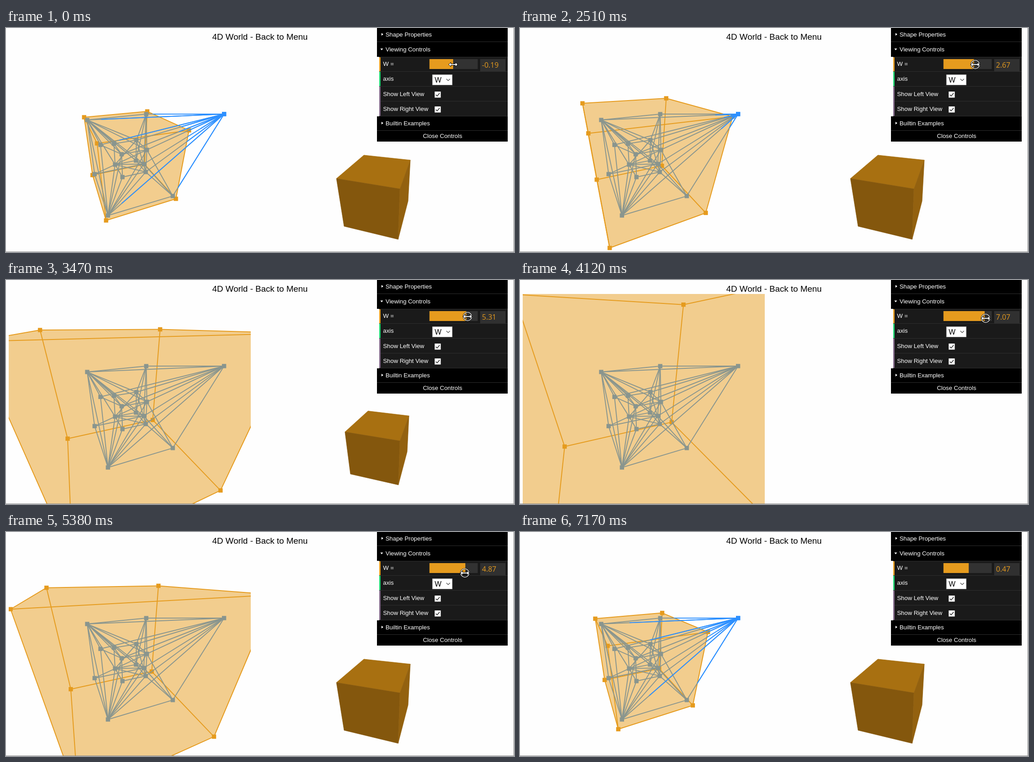
Animation, 1127 px wide and 497 px high, one loop 7.47 s. Source, as an HTML page with a canvas:

```html
<!DOCTYPE html>
<html lang="en">
<head>
<meta charset="utf-8">
<title>4D World</title>
<style>
  html, body { margin: 0; width: 100%; height: 100%; overflow: hidden; background: #fefefe; }
  canvas, svg { position: absolute; left: 0; top: 0; width: 1127px; height: 497px; }
  text { font: 13.3px "Liberation Sans", Arial, sans-serif; fill: #fff; }
  .title { font-size: 19px; fill: #000; text-anchor: middle; }
  .value { font: 16px "Open Sans", "Noto Sans", sans-serif; fill: #e69b1e; }
  .choice { font-size: 16px; fill: #000; }
  .row { fill: #1a1a1a; }
  .rule { stroke: #2f2f2f; }
</style>
</head>
<body>
<canvas id="view" width="1127" height="497"></canvas>
<svg viewBox="0 0 1127 497">
  <path d="M0 496.5H1126.5V0" fill="none" stroke="#8a8a8a"/>
  <text class="title" x="563.5" y="26">4D World - Back to Menu</text>

  <path d="M823 0h290v64H823zM823 196h290v56H823z"/>
  <rect class="row" x="828" y="64" width="285" height="132"/>
  <path class="rule" d="M823 30.5h290M828 64.5h285M828 96.5h285M828 129.5h285M828 162.5h285M828 195.5h285M823 227.5h290"/>
  <path fill="#e69b1e" d="M828 65h3v31h-3z"/>
  <path fill="#1ed36f" d="M828 97h3v32h-3z"/>
  <path fill="#806787" d="M828 130h3v65h-3z"/>
  <path fill="#fff" d="M833 11l4 3-4 3zM833 208l4 3-4 3zM830.5 45.5h6l-3 4z"/>
  <text x="842" y="19">Shape Properties</text>
  <text x="842" y="52">Viewing Controls</text>
  <text x="836.5" y="84">W =</text>
  <text x="836.5" y="117">axis</text>
  <text x="836.5" y="150.5">Show Left View</text>
  <text x="836.5" y="183.5">Show Right View</text>
  <text x="842" y="216">Builtin Examples</text>
  <text x="968.5" y="244" text-anchor="middle">Close Controls</text>

  <rect x="939.5" y="69" width="107" height="22" fill="#323232"/>
  <rect id="fill" x="939.5" y="69" height="22" fill="#e69b1e"/>
  <rect x="1052" y="69" width="56" height="27" fill="#303030"/>
  <text id="value" class="value" x="1056" y="88"></text>

  <rect x="946" y="103.5" width="44" height="23" fill="#fff" stroke="#999" stroke-width=".8"/>
  <text class="choice" x="951" y="121">W</text>
  <path d="M977 113l4 4 4-4" fill="none" stroke="#444" stroke-width="1.2"/>
  <g id="check">
    <rect x="951" y="141" width="13.5" height="13.5" fill="#fff"/>
    <path d="M953.5 148l3 3 5.5-6.5" fill="none" stroke="#222" stroke-width="1.5"/>
  </g>
  <use href="#check" y="33"/>

  <g id="cursor">
    <circle id="press" r="9.3" fill="none" stroke="#000" stroke-width="2.6"/>
    <circle id="ring" r="9.3" fill="none" stroke="#fff" stroke-width="1.3"/>
    <path id="resize" d="M-10 0l5-5v3.5H5V-5l5 5-5 5V1.500H-5V5z" fill="#fff" stroke="#000"/>
    <path id="arrow" d="M0 0v15.5l3.6-3.4 2.4 5.6 2.6-1.1-2.4-5.5h4.9z" fill="#fff" stroke="#000"/>
  </g>
</svg>
<script>
const LOOP = 7470, ORANGE = '#e69b1e', BLUE = '#2d90ff';
const $ = id => document.getElementById(id);
const ctx = $('view').getContext('2d');

// Value of the slider from each moment on.
const steps = [
  [0, -.19], [1480, .03], [1540, .25], [1600, .47], [1710, .69],
  [1850, .91], [1880, 1.13], [2030, 1.57], [2100, 2.01], [2170, 2.23],
  [2450, 2.45], [2510, 2.67], [2640, 3.33], [2940, 3.77], [2990, 3.99],
  [3130, 4.21], [3170, 4.43], [3340, 4.87], [3400, 5.09], [3470, 5.31],
  [3570, 5.97], [3650, 6.41], [3740, 6.63], [3900, 6.85], [4120, 7.07],
  [4820, 6.85], [4850, 6.63], [5000, 6.41], [5080, 6.19], [5160, 5.75],
  [5240, 5.53], [5310, 5.09], [5380, 4.87], [5520, 4.43], [5610, 3.99],
  [5700, 3.33], [5800, 2.89], [5900, 2.45], [6010, 2.01], [6150, 1.57],
  [6340, 1.13], [6390, .69], [6440, .47]
];

// Corner directions from the centre: x, y and nearness per unit of scale.
const corners = {
  A: [-1132, -1007, 0], B: [505, -1337, -1.8], C: [1128, -523, 2.61], D: [-505, -223, 4.22],
  E: [-1130, 525, -2.51], F: [-492, 1303, 1.815], G: [1146, 1018, 0], H: [505, 223, -4.22]
};
const list = text => text.split(' ');
const cubeEdges = list('AB BC CD DA EF FG GH HE AE BH CG DF');
const cubeFaces = list('ABCD EFGH ABHE DCGF ADFE BCGH');

// Lower case is the outer shell of the polytope, upper case the inner one.
const shapeEdges = [
  ...cubeEdges, ...cubeEdges.map(edge => edge.toLowerCase()),
  ...list('Aa Bb Cc Dd Ee Ff Gg Hh ac af ah cf ch fh EB EG EC BG'),
  ...list('aB aD aE cB cD cG fE fD fG bH hG hE aC aH fC gC bC')
];
const shellScale = key => key === 'c' ? 1 / 8 : key > 'Z' ? 1 / 12 : .031;

function place(key, scale) {
  const [x, y, near] = corners[key.toUpperCase()];
  return [x * scale, y * scale, 1 - near * scale];
}
const shapePoint = key => place(key, shellScale(key));
const mix = (p, q, t) => p.map((v, i) => v + (q[i] - v) * t);
const screen = ([x, y, depth]) => [274.5 + x / depth, 288 + y / depth];

// Keeps the part of a polygon that lies before the camera.
function clipNear(points) {
  const near = .03, out = [];
  points.forEach((p, i) => {
    const q = points[(i + 1) % points.length];
    if (p[2] >= near) out.push(p);
    if ((p[2] >= near) !== (q[2] >= near)) out.push(mix(p, q, (near - p[2]) / (q[2] - p[2])));
  });
  return out.map(screen);
}

function trace(points) {
  points.forEach(([x, y], i) => i ? ctx.lineTo(x, y) : ctx.moveTo(x, y));
}

function segment(p, q, color) {
  ctx.beginPath();
  trace(clipNear([p, q]));
  ctx.strokeStyle = color;
  ctx.stroke();
}

function marker(p, color) {
  if (p[2] < .03) return;
  const [x, y] = screen(p);
  ctx.fillStyle = color;
  ctx.fillRect(x - 4.75, y - 4.75, 9.5, 9.5);
}

const isFront = key => 'CDFG'.includes(key.toUpperCase()) ? 1 : -1;
const isTop = key => 'ABCD'.includes(key.toUpperCase()) ? 1 : -1;

// Where the way from a point to corner c leaves the cube by a visible face.
function exitAt(key, scale) {
  return Math.min(...[isFront, isTop].map(sign => {
    const from = sign(key) * shellScale(key);
    return (scale - from) / (shellScale('c') - from);
  }));
}

function drawWorld(w) {
  const scale = 1 / (11 - w);
  const corner = key => place(key, scale);
  ctx.save();
  ctx.beginPath();
  ctx.rect(6, 31, 537, 465);
  ctx.clip();
  ctx.lineWidth = 2;
  ctx.lineJoin = 'bevel';

  for (const [a, b] of cubeEdges) segment(corner(a), corner(b), ORANGE);
  for (const key in corners) marker(corner(key), ORANGE);
  for (const [a, b] of shapeEdges) segment(shapePoint(a), shapePoint(b), BLUE);
  for (const key of 'ABCDEFGHabcdefgh') marker(shapePoint(key), BLUE);

  ctx.beginPath();
  for (const face of cubeFaces) {
    const points = clipNear([...face].map(corner));
    const area = points.reduce((sum, [x, y], i) => {
      const [nx, ny] = points[(i + 1) % points.length];
      return sum + x * ny - y * nx;
    }, 0);
    trace(area < 0 ? points.reverse() : points);
    ctx.closePath();
  }
  ctx.globalAlpha = .5;
  ctx.fillStyle = ORANGE;
  ctx.fill();
  ctx.globalAlpha = 1;

  const tip = shapePoint('c');
  if (shellScale('c') > scale) {
    for (const edge of shapeEdges.filter(e => e.includes('c'))) {
      const key = edge.replace('c', '');
      segment(mix(shapePoint(key), tip, exitAt(key, scale)), tip, BLUE);
    }
    marker(tip, BLUE);
  }
  ctx.restore();
}

// Slice cube: corners relative to the nearest one, with their extra distance.
const slice = {
  n: [0, 0, 0], l: [-141, -23, .18], r: [23, -64, .22], d: [-4, 112, .25],
  t: [-80, -75, .42], f: [-124, 83, .43], b: [18, 27, .45]
};
const sliceFaces = { ltrn: '#a87011', lndf: '#84570d', nrbd: '#93610f' };

function drawSlice(w) {
  const size = Math.min(1, (7 - w) / 2);
  if (size <= 0) return;
  for (const face in sliceFaces) {
    ctx.beginPath();
    trace([...face].map(key => {
      const [x, y, far] = slice[key];
      const k = size * (1 + far) / (1 + size * far);
      return [874 + x * k, 357 + y * k];
    }));
    ctx.closePath();
    ctx.fillStyle = ctx.strokeStyle = sliceFaces[face];
    ctx.lineWidth = .7;
    ctx.fill();
    ctx.stroke();
  }
}

const show = (id, on) => $(id).style.display = on ? '' : 'none';
const ramp = (t, from, to) => Math.max(0, Math.min(1, (t - from) / (to - from)));

function moveCursor(t, sliderEnd) {
  let x = sliderEnd, y = 81 + 4 * ramp(t, 3740, 4120) + 6 * ramp(t, 4680, 5380) + 4 * ramp(t, 5520, 6150);
  if (t >= 710) x += t < 4680 ? 2 : t < 6000 ? -2 : 0;
  if (t >= 6500) {
    const k = ramp(Math.floor(t / 45) * 45, 6500, 7060);
    x = 996 + 34 * k + 10 * ramp(t, 7060, 7160);
    y = 95 + 379 * k * k * (3 - 2 * k) + 12 * ramp(t, 7060, 7160);
  }
  const pressed = t >= 710 && t < 6500, pointing = t >= 6100;
  show('cursor', t < 7170);
  show('press', pressed);
  show('ring', pressed);
  show('resize', !pointing);
  show('arrow', pointing);
  $('cursor').setAttribute('transform', `translate(${Math.round(x)} ${Math.round(y)})`);
}

function frame(now) {
  const t = now % LOOP;
  const w = steps.findLast(([start]) => start <= t)[1];
  const width = 107 * (w + 10) / 20;
  ctx.clearRect(0, 0, 1127, 497);
  drawWorld(w);
  drawSlice(w);
  $('fill').setAttribute('width', width);
  $('value').textContent = w.toFixed(2);
  moveCursor(t, 940 + width);
  requestAnimationFrame(frame);
}
requestAnimationFrame(frame);
</script>
</body>
</html>
```
